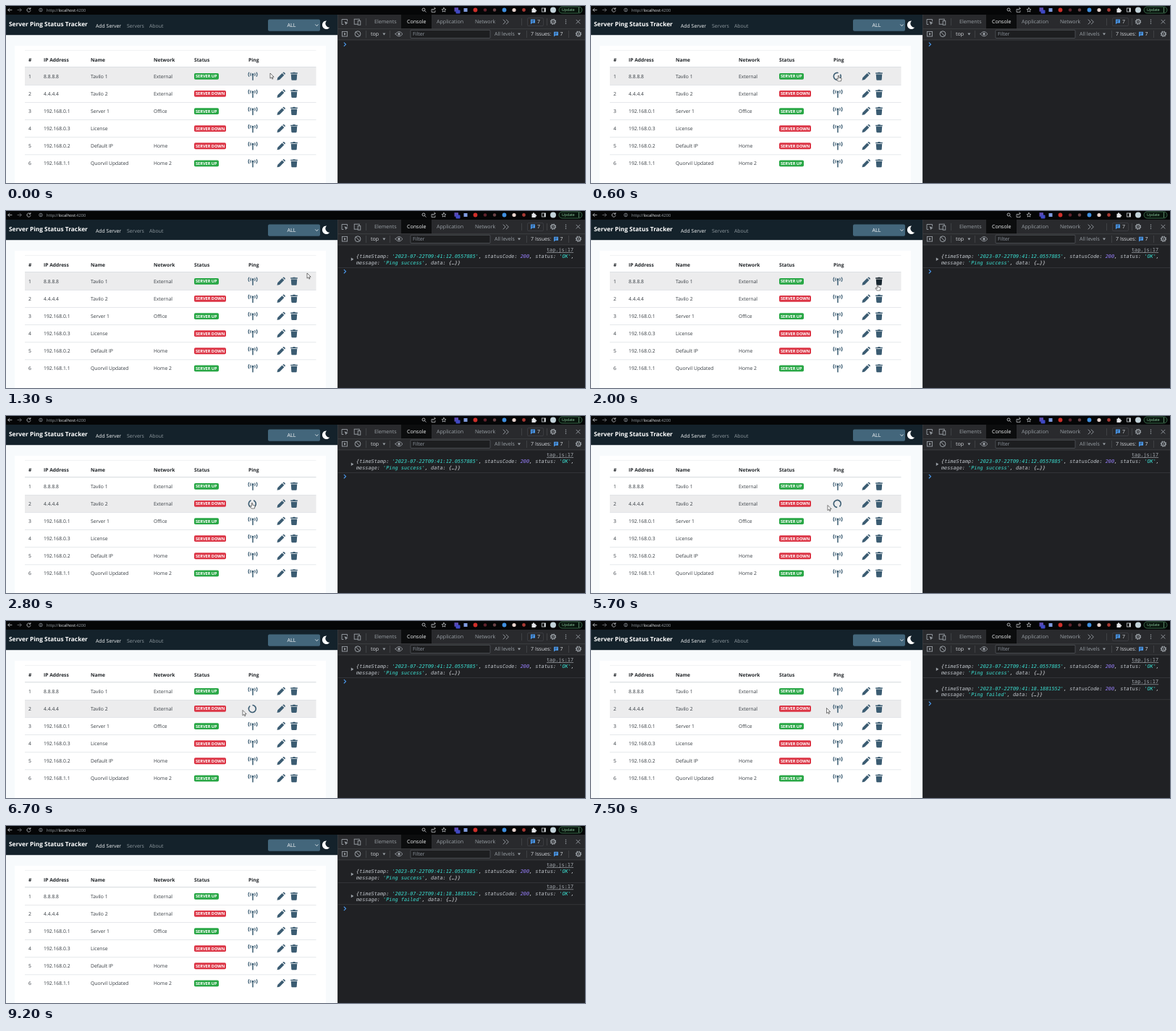
An HTML page that plays this animation: 800 by 245 pixels, repeating every 9300 ms.

```html
<!DOCTYPE html>
<html lang="en">
<head>
<meta charset="utf-8">
<title>Server Ping Status Tracker</title>
<style>
html, body { margin: 0; width: 100%; height: 100%; overflow: hidden; background: #202124; }
svg { display: block; width: 800px; height: 245px; }
text { font-family: "Open Sans", "Noto Sans", sans-serif; text-rendering: geometricPrecision; }
.mono { font-family: "DejaVu Sans Mono", "Noto Sans Mono", monospace; font-size: 6.85px; }
.b { font-weight: 700; }
.line { fill: none; stroke-linecap: round; stroke-linejoin: round; }
</style>
</head>
<body>
<svg id="stage" viewBox="0 0 800 245"></svg>
<script>
const LOOP = 9300, STEP = 100;
const ROW_TOP = 85.3, ROW_H = 24.1;
const ICON = '#3b5c72', ICON_HOVER = '#18262f', GREY = '#9aa0a6', LIGHT = '#d5d8dc', BLUE = '#4c9df3', GREEN = '#8fd0a2';

const rect = (x, y, w, h, fill, more = '') =>
  `<rect x="${x}" y="${y}" width="${w}" height="${h}" fill="${fill}" ${more}/>`;
const circle = (x, y, r, fill, more = '') =>
  `<circle cx="${x}" cy="${y}" r="${r}" fill="${fill}" ${more}/>`;
const label = (x, y, s, size, fill, more = '') =>
  `<text x="${x}" y="${y}" font-size="${size}" fill="${fill}" ${more}>${s}</text>`;
const stroke = (d, color, w = 1, more = '') =>
  `<path class="line" d="${d}" stroke="${color}" stroke-width="${w}" ${more}/>`;
const shape = (d, fill, more = '') => `<path d="${d}" fill="${fill}" ${more}/>`;
const at = (x, y, body, more = '') => `<g transform="translate(${x} ${y})" ${more}>${body}</g>`;

const gear = (x, y) => circle(x, y, 2.7, 'none', `stroke="${GREY}" stroke-width="1.2"`) +
  circle(x, y, 3.7, 'none', `stroke="${GREY}" stroke-width="1.1" stroke-dasharray="1.45 1.456"`) +
  circle(x, y, .9, GREY);
const dots = (x, y, color) => [-2.5, 0, 2.5].map(d => circle(x, y + d, .75, color)).join('');
const bubble = (x, y) => shape(`M${x - 3} ${y - 3}h6v5h-4.2l-1.8 1.8z`, BLUE) +
  stroke(`M${x - 1.6} ${y - 1.4}h3.2M${x - 1.6} ${y + .3}h2`, '#202124', .6);
const divider = (x, y, h) => rect(x, y, .7, h, '#4a4c50');

function browserBar() {
  const c = '#c9ccd0';
  let s = rect(0, 0, 800, 12, '#050607');
  s += stroke('M8 5.5H2.8M5 3.2L2.8 5.5L5 7.8', c, .8);
  s += stroke('M16 5.5h5.2M19 3.2l2.2 2.3l-2.2 2.3', '#75787c', .8);
  s += stroke('M33.6 4A2.6 2.6 0 1 0 34 6.4M33.9 2.6V4.3H32.2', c, .8);
  s += circle(48, 5.5, 2.3, 'none', `stroke="${GREY}" stroke-width=".7"`) + stroke('M48 5.3v1.3M48 4.2v.1', GREY, .7);
  s += label(56, 7.6, '<tspan>http://</tspan><tspan fill="#e8eaed">localhost</tspan>:4200', 5.6, GREY);
  s += circle(577, 5, 2, 'none', `stroke="${c}" stroke-width=".8"`) + stroke('M578.6 6.6l1.6 1.7', c, .8);
  s += stroke('M589.5 4.5h-1.5v4h5v-2M589.8 6q.2-2.6 3.2-2.6M591.7 2l1.6 1.4l-1.6 1.5', c, .7);
  s += stroke('M605 2.4l.9 2l2.1.2l-1.6 1.4l.5 2.1l-1.9-1.1l-1.9 1.1l.5-2.1l-1.6-1.4l2.1-.2z', c, .7);
  s += rect(619.5, 2.2, 5.5, 5.5, '#5b4bb5') + rect(621.5, 5.5, 6, 5, '#3f49c4', 'rx="1"');
  s += rect(632.5, 3, 5, 5, '#7f9be0') + circle(648.5, 5.5, 2.9, '#cf2f2a');
  s += circle(662, 5.5, 2.3, '#61232d') + circle(675, 5.5, 2.2, '#6b4347');
  s += circle(688.5, 5.5, 2.9, '#3f8fe0') + circle(702, 5.5, 2.6, '#e6d2cc') + circle(715.5, 5.5, 2.4, '#a83a34');
  s += shape('M726.5 3.8h1.5q-.3-1.6 1-1.6t1 1.6h1.7v1.7q1.6-.3 1.6 1t-1.6 1v1.4h-5.2z', '#e3e5e8');
  s += rect(740.5, 3, 5, 5, 'none', `stroke="${c}" stroke-width=".8"`) + rect(743.5, 3, 2, 5, c);
  s += circle(756, 5.5, 4, '#c3d3da');
  s += rect(764, 1, 32, 9, '#08140d', `rx="4.5" stroke="#4f8a62" stroke-width=".7"`);
  return s + label(768, 7.4, 'Update', 5.2, GREEN) + dots(791.5, 5.5, GREEN);
}

function navBar() {
  return rect(0, 12, 458, 28.2, '#14222b') +
    label(4, 28, 'Server Ping Status Tracker', 8.35, '#fff', 'class="b"') +
    label(124, 29.6, 'Add Server', 6.9, '#f4f6f7') +
    label(167, 29.6, 'Servers', 6.9, '#8f999f') +
    label(198, 29.6, 'About', 6.9, '#8f999f') +
    rect(362, 18.5, 72, 16.3, '#43667b', 'rx="2"') +
    label(394.5, 29.4, 'ALL', 7.1, '#fff', 'text-anchor="middle"') +
    stroke('M427.6 25.8l1.8 1.8l1.8-1.8', '#fff', .8) +
    shape('M443 20.4A5.8 5.8 0 1 0 447.4 29.6A5.4 5.4 0 0 1 443 20.4z', '#fff');
}

const tower = circle(0, -2.6, 1.4, 'currentColor') + stroke('M0-2.6V5', 'currentColor', 1.5) +
  stroke('M-2.8-4.3Q-3.8-2.6-2.8-.9M2.8-4.3Q3.8-2.6 2.8-.9M-5.2-5.3Q-6.9-2.6-5.2.1M5.2-5.3Q6.9-2.6 5.2.1', 'currentColor', 1.1);
const pencil = shape('M-5.5 5.5L-4.7 1.9L1.5-4.3L4.3-1.5L-1.9 4.7zM2.3-5.1L3-5.7Q3.8-6.1 4.5-5.4L5.4-4.5Q6.1-3.8 5.7-3L5.1-2.3z', 'currentColor');
const trash = shape('M-4.8-5H-2L-1.4-5.7H1.4L2-5H4.8V-3.5H-4.8zM-4.2-2.8H4.2L3.7 4.4Q3.6 5.5 2.6 5.5H-2.6Q-3.6 5.5-3.7 4.4z', 'currentColor');
const notch = stroke('M-2.3-4.4A5 5 0 1 0 2.3-4.4', 'currentColor', 1.6);

const ROWS = [
  ['8.8.8.8', 'Tavilo 1', 'External', true],
  ['4.4.4.4', 'Tavilo 2', 'External', false],
  ['192.168.0.1', 'Server 1', 'Office', true],
  ['192.168.0.3', 'License', '', false],
  ['192.168.0.2', 'Default IP', 'Home', false],
  ['192.168.1.1', 'Quorvil Updated', 'Home 2', true]
];
const COLS = [31, 52, 117, 204, 260, 335];
const rowMid = i => ROW_TOP + ROW_H * (i + .5);

function table() {
  let s = rect(0, 40, 458, 205, '#f7fafc') + rect(12, 55, 430, 190, '#fff');
  s += rect(26, ROW_TOP, 402.5, ROW_H, '#ececed', 'id="hover"');
  s += rect(26, 61, 402.5, .5, '#e3e6e9') + rect(26, 84.2, 402.5, 1, '#d5d9dd');
  ['#', 'IP Address', 'Name', 'Network', 'Status', 'Ping'].forEach((h, i) =>
    s += label(COLS[i], 76.6, h, 6.7, '#212529', 'class="b"'));
  ROWS.forEach(([ip, name, net, up], i) => {
    const y = rowMid(i);
    [i + 1, ip, name, net].forEach((v, c) => s += label(COLS[c], y + 2.5, v, 6.8, '#373d43'));
    s += rect(260, y - 4.4, up ? 34 : 44, 8.8, up ? '#28a745' : '#dc3545', 'rx="1.8"');
    s += label(262, y + 2, up ? 'SERVER UP' : 'SERVER DOWN', 5.6, '#fff', 'class="b"');
    s += at(341, y, tower, `id="ping${i}"`) + at(380, y, pencil, `id="edit${i}"`) + at(398, y, trash, `id="del${i}"`);
    if (i < 5) s += rect(26, ROW_TOP + ROW_H * (i + 1) - .3, 402.5, .7, '#dbdfe3');
  });
  return `<g color="${ICON}">${s}<g id="spin">${notch}</g></g>`;
}

function entry(n, stamp, result) {
  const key = s => `<tspan fill="#c3c8ce">${s}</tspan>`;
  const str = s => `<tspan fill="#3be0d2">'${s}'</tspan>`;
  const mono = (x, y, s, more) => label(x, y, s, 6.85, LIGHT, 'class="mono" ' + more);
  return at(0, n * 30.2,
    mono(747, 56.3, 'tap.js:17', 'text-decoration="underline" style="fill:#a4a9af"') +
    shape('M476.8 64.6l3.6 2.2l-3.6 2.2z', GREY) +
    mono(484, 65.4, `{${key('timeStamp')}: ${str(stamp)}, ${key('statusCode')}: <tspan fill="#9980ff">200</tspan>, ${key('status')}: ${str('OK')},`, 'font-style="italic"') +
    mono(484, 74, `${key('message')}: ${str(result)}, ${key('data')}: {…}}`, 'font-style="italic"') +
    rect(458, 78.2, 342, .7, '#3a3c40'), `id="log${n}"`);
}

function devTools() {
  let s = rect(458, 12, 342, 233, '#202124') + rect(458, 12, 342, 35, '#292a2d');
  s += rect(546, 12, 42, 19.6, '#0c0d0e') + rect(458, 31.4, 342, .7, '#44464a') + rect(458, 46.6, 342, .7, '#44464a');
  s += rect(458, 12, .7, 233, '#3c3e42');
  s += stroke('M466 25.5h-2v-7h7.6v2.6', GREY, .9) + shape('M467.6 21.3l5 2l-2 .9l-.9 2z', GREY);
  s += rect(481.2, 18.2, 7, 7, 'none', `stroke="${GREY}" stroke-width=".9"`) +
    rect(486.2, 20.6, 3.6, 5.6, '#292a2d', `stroke="${GREY}" stroke-width=".9"`);
  [497, 712, 747].forEach(x => s += divider(x, 17, 10));
  [['Elements', 509], ['Console', 554], ['Application', 595], ['Network', 648]].forEach(([t, x]) =>
    s += label(x, 24.4, t, 7.1, t === 'Console' ? '#f1f3f4' : GREY));
  s += stroke('M687 19l3.2 3l-3.2 3M691.2 19l3.2 3l-3.2 3', GREY, .9);
  s += rect(720.5, 16.6, 22, 11, 'none', 'rx="1.5" stroke="#44464a" stroke-width=".7"') + bubble(728, 21.6) + label(734, 24.4, '7', 7, LIGHT);
  s += gear(756, 21.8) + dots(773.5, 21.8, GREY) + stroke('M788 19.2l5 5M793 19.2l-5 5', GREY, .9);

  s += rect(464.4, 35.4, 7.2, 6.6, 'none', `stroke="${GREY}" stroke-width=".9"`) + shape('M467 37l3 1.7l-3 1.7z', GREY);
  s += circle(486, 38.7, 3.9, 'none', `stroke="${GREY}" stroke-width="1"`) + stroke('M483.4 36l5.2 5.4', GREY, 1);
  [497, 530, 719, 777].forEach(x => s += divider(x, 34, 10));
  s += label(504, 41.2, 'top', 7.1, LIGHT) + shape('M520.4 37.6h4l-2 2.8z', GREY);
  s += stroke('M538 38.7Q543 32.2 548 38.7Q543 45.2 538 38.7z', GREY, .9) + circle(543, 38.7, 1.7, GREY);
  s += rect(559, 33.3, 110, 11.2, '#1d1e20', 'rx="1" stroke="#5b5e63" stroke-width=".7"') + label(562, 41.2, 'Filter', 7, '#9097a0');
  s += label(675, 41.2, 'All levels', 7, GREY) + shape('M707 37.6h4l-2 2.8z', GREY);
  s += label(725, 41.2, '7 Issues:', 7.1, LIGHT) + bubble(760, 38.8) + label(765.5, 41.2, '7', 7, LIGHT) + gear(791, 38.7);

  s += entry(0, '2023-07-22T09:41:12.0557885', 'Ping success') + entry(1, '2023-07-22T09:41:18.1881552', 'Ping failed');
  return s + stroke('M467.2 50.8l2.4 2.3l-2.4 2.3', BLUE, 1.1, 'id="prompt"');
}

const arrow = shape('M0 0V7.2L1.7 5.7L2.8 8.1L4 7.6L2.9 5.2H5.2z', '#fff', 'stroke="#222" stroke-width=".6" id="arrow"');
const hand = shape('M-.7.6Q0-.5.7.6V3.2L3.6 3.9Q4.2 4.2 4 5L3.4 8H-.8L-3 5.2Q-2.9 4.2-1.9 4.6L-.7 5.4z', '#fff', 'stroke="#222" stroke-width=".6" id="hand"');

document.getElementById('stage').innerHTML =
  browserBar() + table() + navBar() + devTools() + `<g id="cursor">${arrow}${hand}</g>`;
const $ = id => document.getElementById(id);
const show = (id, on) => $(id).setAttribute('visibility', on ? 'visible' : 'hidden');
const move = (id, x, y) => $(id).setAttribute('transform', `translate(${x} ${y})`);

// time, x, y of the pointer tip
const PATH = [
  [0, 365, 93], [300, 342, 96], [700, 342, 96], [1100, 414, 88], [1300, 416, 86],
  [1600, 411, 94], [1900, 397, 102], [2000, 396, 102], [2100, 395, 103], [2500, 340, 120],
  [2800, 340, 120], [3400, 327, 123.5], [7000, 327, 123.5], [7300, 325.5, 120.5], [LOOP, 325.5, 120.5]
];
// row, start, end
const PINGS = [[0, 400, 700], [1, 2800, 6800]];
const LEAVE = 7600;

function pointer(t) {
  const i = PATH.findIndex(p => p[0] > t);
  const [t0, x0, y0] = PATH[i - 1], [t1, x1, y1] = PATH[i];
  const k = (t - t0) / (t1 - t0), e = k * k * (3 - 2 * k);
  return [x0 + (x1 - x0) * e, y0 + (y1 - y0) * e];
}

function draw(t) {
  const [x, y] = pointer(t), inside = t < LEAVE;
  const row = inside ? Math.floor((y - ROW_TOP) / ROW_H) : -1;
  show('hover', row >= 0);
  $('hover').setAttribute('y', ROW_TOP + ROW_H * Math.max(row, 0));

  const ping = PINGS.find(p => t >= p[1] && t < p[2]);
  let hot = false;
  ROWS.forEach((_, i) => {
    [['ping', 341], ['edit', 380], ['del', 398]].forEach(([id, cx]) => {
      const over = i === row && Math.abs(x - cx) < 6.5 && Math.abs(y - rowMid(i)) < 6.5;
      hot = hot || over;
      $(id + i).setAttribute('color', over ? ICON_HOVER : ICON);
    });
    show('ping' + i, !ping || ping[0] !== i);
  });

  show('spin', ping);
  if (ping) $('spin').setAttribute('transform',
    `translate(340.3 ${rowMid(ping[0])}) rotate(${(t - ping[1]) * .18})`);

  const logs = PINGS.filter(p => t >= p[2]).length;
  show('log0', logs > 0);
  show('log1', logs > 1);
  move('prompt', 0, logs * 30.6);

  move('cursor', x, y);
  show('arrow', inside && !hot);
  show('hand', inside && hot);
}

const start = performance.now();
function tick() {
  const t = (performance.now() - start) % LOOP;
  draw(Math.floor(t / STEP) * STEP);
  requestAnimationFrame(tick);
}
tick();
</script>
</body>
</html>
```
